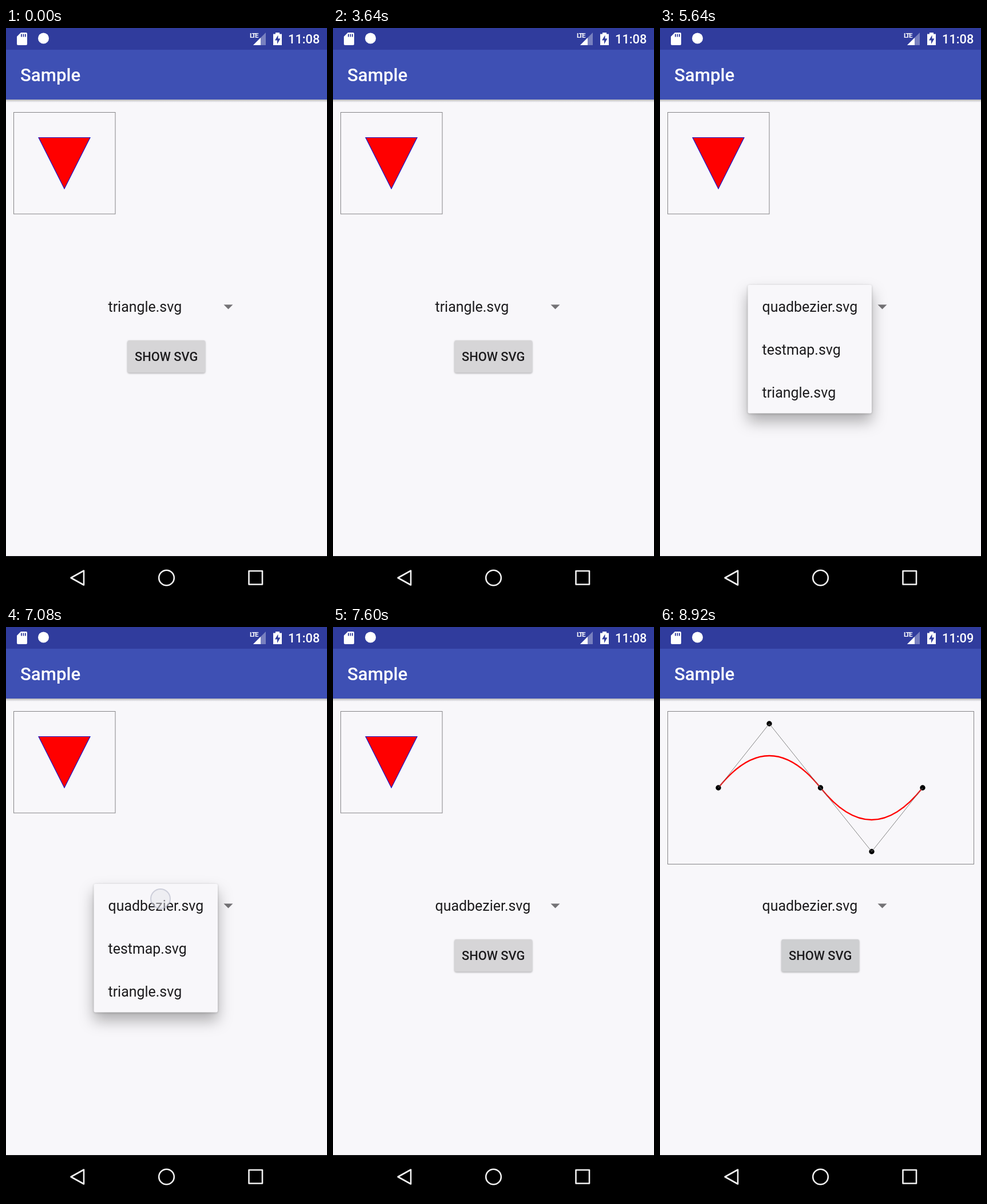
An HTML page that plays this animation: 561x998 px, repeating every 9640 ms.

```html
<!DOCTYPE html>
<html lang="en">
<head>
<meta charset="utf-8">
<title>Sample</title>
<style>
  html, body { margin: 0; width: 100%; height: 100%; overflow: hidden; background: #f8f7fa; }
  svg { display: block; width: 100%; height: 100%; }
  text { font: 400 24.94px Roboto, sans-serif; fill: #1c1b1d; }
  .medium { font-weight: 500; font-size: 21.8px; }
  .title { font-weight: 500; font-size: 31.2px; fill: #fff; }
  .network { font-weight: 700; font-size: 11.5px; letter-spacing: -1.6px; fill: #fff; }
  .border { fill: none; stroke: #858487; }
  #popup { filter: drop-shadow(0 1px 2px #0003) drop-shadow(0 14px 13px #0000004d); }
  #button { filter: drop-shadow(0 1.5px 1.5px #0005); }
</style>
</head>
<body>
<svg viewBox="0 0 561 998">
  <defs>
    <linearGradient id="barShadow" x2="0" y2="1">
      <stop stop-color="#000" stop-opacity=".32"/>
      <stop offset="1" stop-color="#000" stop-opacity="0"/>
    </linearGradient>
    <clipPath id="firstRow"><rect x="154" y="449" width="216" height="75"/></clipPath>
  </defs>

  <rect width="561" height="998" fill="#f8f7fa"/>
  <rect y="124" width="561" height="6" fill="url(#barShadow)"/>
  <rect width="561" height="125" fill="#3e50b4"/>
  <rect width="561" height="38" fill="#303c9d"/>
  <text class="title" x="25" y="93">Sample</text>

  <!-- status bar -->
  <g fill="#fff">
    <path d="M26 8H35Q37 8 37 10V28Q37 30 35 30H21Q19 30 19 28V15Z"/>
    <path d="M27 10.5v5M30.5 10.5v5M34 10.5v5" stroke="#303c9d" stroke-width="1.8"/>
    <circle cx="65.5" cy="18" r="9.5"/>
    <path d="M432 30L454 8V30Z" opacity=".35"/>
    <path d="M432 30L445 17V30Z"/>
    <path d="M471 8h7v2.5h4V30H467V10.5h4Z"/>
    <path d="M475.5 12.5L470 21.5H474V28L479.5 18.5H475.5Z" fill="#303c9d"/>
  </g>
  <text class="network" x="426" y="17">LTE</text>
  <text class="medium" id="clock" x="493" y="27" style="fill:#fff"></text>

  <!-- pictures -->
  <g id="triangle">
    <rect class="border" x="13.5" y="147.5" width="177.5" height="177.5"/>
    <path d="M57 191.5H147L102 281Z" fill="red" stroke="#1a12c8" stroke-width="1.2"/>
  </g>
  <g id="curve">
    <rect class="border" x="13.5" y="147.5" width="535" height="267"/>
    <path d="M102 281Q191 169 280.5 281T459 281" fill="none" stroke="red" stroke-width="2.3"/>
    <path d="M102 281h0M191 169h0M280.5 281h0M370 392.5h0M459 281h0" stroke="#000" stroke-width="9.4" stroke-linecap="round"/>
    <path d="M102 281L191 169L280.5 281L370 392.5L459 281" fill="none" stroke="#777" stroke-width=".9"/>
  </g>

  <!-- controls -->
  <text id="choice" x="178.5" y="496"></text>
  <path d="M380.5 483.5H396.500L388.500 491.500Z" fill="#747376"/>
  <rect id="button" x="212.5" y="546" width="135.500" height="56.500" rx="3"/>
  <text class="medium" x="225" y="582">SHOW SVG</text>

  <g id="popup">
    <rect id="sheet" x="153.500" y="449" width="216.500" height="224.500" rx="3"/>
    <g id="ripple" clip-path="url(#firstRow)">
      <rect x="154" y="449" width="216" height="75" opacity=".035"/>
      <circle id="wave" cx="266" cy="475" opacity=".04"/>
    </g>
    <text x="178.500" y="496">quadbezier.svg</text>
    <text x="178.500" y="571">testmap.svg</text>
    <text x="178.500" y="646">triangle.svg</text>
  </g>

  <circle id="touch" r="17" fill="#e6e6ec" fill-opacity=".5" stroke="#b4b8c8" stroke-opacity=".6" stroke-width="2"/>

  <!-- navigation bar -->
  <rect y="923" width="561" height="75"/>
  <g fill="none" stroke="#f2f2f2" stroke-width="2.6" stroke-linejoin="round">
    <path d="M113.500 961L136 948.500V973.500Z"/>
    <circle cx="280.500" cy="961" r="13.300"/>
    <rect x="424.500" y="949" width="23.500" height="23.500"/>
  </g>
</svg>
<script>
  const LOOP = 9640, STEP = 40;
  const OPEN = 4120, PICK = 7240, FADE = 7470, CLOSED = 7600, DRAWN = 8600, SETTLED = 8760;
  const touches = [
    { from: 2960, to: 3640, x: 290, y: 488 },
    { from: 6880, to: PICK, x: 270, y: 475 },
    { from: 8240, to: DRAWN, x: 291, y: 579 }
  ];
  const el = id => document.getElementById(id);
  const set = (id, attrs) => {
    for (const name in attrs) el(id).setAttribute(name, attrs[name]);
  };
  const show = (id, visible) => set(id, { visibility: visible ? 'visible' : 'hidden' });

  function render(t) {
    const touch = touches.find(p => t >= p.from && t < p.to);
    show('touch', touch);
    if (touch) set('touch', { cx: touch.x, cy: touch.y });

    const fading = t >= FADE;
    show('popup', t >= OPEN && t < CLOSED);
    set('popup', { opacity: fading ? Math.max(0, 1 - (t - FADE) / 200) : 1 });
    set('sheet', { fill: fading ? '#e0e0e2' : '#f8f7fa' });
    set('ripple', { display: t >= PICK ? 'inline' : 'none' });
    set('wave', { r: Math.max(0, Math.min(106, 20 + (t - PICK) * 0.27)) });

    show('triangle', t < DRAWN);
    show('curve', t >= DRAWN);
    set('button', { fill: t < SETTLED ? '#d6d5d7' : '#cecfd1' });
    el('choice').textContent = t < FADE ? 'triangle.svg' : 'quadbezier.svg';
    el('clock').textContent = t < SETTLED ? '11:08' : '11:09';
  }

  const start = performance.now();
  function tick() {
    const t = (performance.now() - start) % LOOP;
    render(Math.floor(t / STEP) * STEP);
    requestAnimationFrame(tick);
  }
  tick();
</script>
</body>
</html>
```
